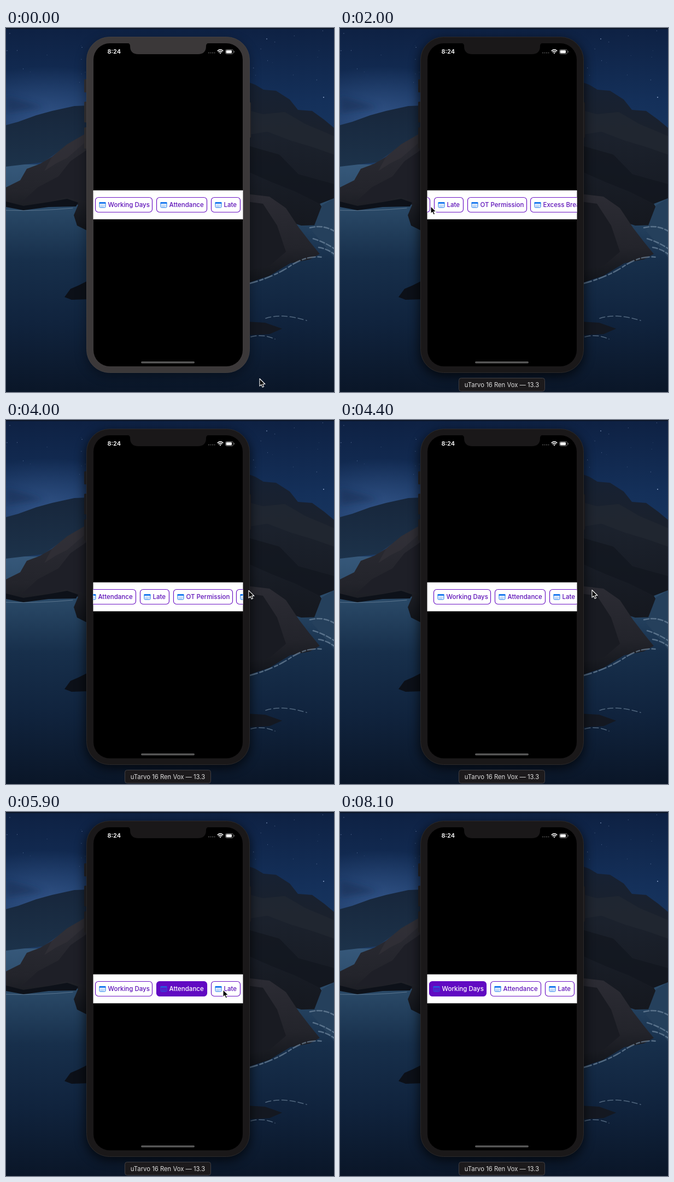
An HTML page for the animation above (8.2 s loop, 600x667 px).

```html
<!DOCTYPE html>
<html lang="en">
<head>
<meta charset="utf-8">
<title>Chip scroller</title>
<style>
  html, body { margin: 0; width: 100%; height: 100%; overflow: hidden; background: #0b1a35; }
  svg { display: block; width: 600px; height: 667px; font-family: Inter, Roboto, sans-serif; }
  .case { fill: #3b3839; stroke: #434041; }
  .key { fill: #2c2a2c; }
  .active .case { fill: #1a1819; stroke: #2b292a; }
  .active .key { fill: #1b1a1c; }
  .glow { opacity: .35; }
  .active .glow { opacity: .7; }
  .chip .box { fill: #fff; stroke: #6a12c4; stroke-width: 1.2; }
  .chip text { fill: #5d10b8; font-size: 11.5px; font-weight: 500; }
  .chip .page { fill: #f2f8ff; stroke: #1878ee; }
  .chip .head { fill: #1878ee; }
  .chip .rows { stroke: #5f9fe8; stroke-width: .9; stroke-dasharray: 1.3 .9; }
  .chip.on .box { fill: #610ac2; stroke: #610ac2; }
  .chip.on text { fill: #fff; }
  .chip.on .page { fill: #5a16c8; stroke: #2b55dc; }
  .chip.on .head { fill: #2b55dc; }
  .chip.on .rows { stroke: #3550dc; }
</style>
</head>
<body>
<svg viewBox="0 0 600 667">
  <defs>
    <linearGradient id="sky" x2="0" y2="1">
      <stop offset="0" stop-color="#0e2143"/>
      <stop offset=".45" stop-color="#14305a"/>
      <stop offset="1" stop-color="#1d3d66"/>
    </linearGradient>
    <radialGradient id="dusk">
      <stop offset="0" stop-color="#34568a" stop-opacity=".9"/>
      <stop offset="1" stop-color="#34568a" stop-opacity="0"/>
    </radialGradient>
    <linearGradient id="sea" x2="0" y2="1">
      <stop offset="0" stop-color="#36587a"/>
      <stop offset=".2" stop-color="#294866"/>
      <stop offset=".42" stop-color="#172f4b"/>
      <stop offset=".7" stop-color="#10233d"/>
      <stop offset="1" stop-color="#0a1628"/>
    </linearGradient>
    <linearGradient id="far" x2="0" y2="1">
      <stop offset="0" stop-color="#17263b"/>
      <stop offset="1" stop-color="#1c324a"/>
    </linearGradient>
    <linearGradient id="rock" x2="0" y2="1">
      <stop offset="0" stop-color="#2c2c34"/>
      <stop offset=".6" stop-color="#23242b"/>
      <stop offset="1" stop-color="#11141a"/>
    </linearGradient>
    <linearGradient id="peak" x2="0" y2="1">
      <stop offset="0" stop-color="#162133"/>
      <stop offset=".4" stop-color="#1b212c"/>
      <stop offset="1" stop-color="#15181f"/>
    </linearGradient>
    <filter id="soft" x="-30%" y="-20%" width="160%" height="140%"><feGaussianBlur stdDeviation="10"/></filter>
    <filter id="haze" x="-40%" y="-40%" width="180%" height="180%"><feGaussianBlur stdDeviation="6"/></filter>
    <clipPath id="view"><rect x="159.5" y="297.5" width="274" height="53"/></clipPath>
  </defs>

  <!-- coast at dusk -->
  <rect width="600" height="300" fill="url(#sky)"/>
  <ellipse cx="75" cy="165" rx="190" ry="95" fill="url(#dusk)"/>
  <rect width="600" height="2" fill="#0b1527"/>
  <path d="M0 126Q40 136 70 146L0 156Z" fill="#142a50" opacity=".5" filter="url(#haze)"/>
  <g id="stars" fill="#9db4d8"></g>
  <rect y="250" width="600" height="417" fill="url(#sea)"/>
  <path d="M0 178L22 172L55 160L84 152L125 143L150 142V195L105 220L68 246L0 254Z" fill="url(#far)"/>
  <path d="M150 191L112 213L84 236L62 249L38 258L26 279L0 292V324L32 331L78 325L112 318L132 324L124 343L130 362L150 372Z" fill="url(#rock)"/>
  <path d="M150 222L118 244L96 272L58 292L30 318L78 318L108 310L150 318Z" fill="#1e1f27"/>
  <path d="M112 213L84 236L70 262L92 248L112 238L150 205V191Z" fill="#34323a" opacity=".6"/>
  <path d="M0 318L32 326L78 319L112 313L132 320L128 327L78 328L32 334L0 328Z" fill="#0d1119"/>
  <path d="M107 493L118 478L132 472L150 463V497L120 498Z" fill="#0c1018"/>
  <path d="M440 98L456 104L471 113L494 115L519 131L534 150L560 152L582 168L600 183V312L574 322L586 342L582 361L540 362L440 330Z" fill="url(#peak)"/>
  <path d="M440 150L470 158L510 154L548 176L600 198V232L560 218L520 206L478 190L440 196Z" fill="#232832" opacity=".7"/>
  <path d="M440 215L500 232L535 268L600 286V312L574 322L530 300L485 282L440 262Z" fill="#12161f" opacity=".7"/>
  <path d="M578 325L600 312V420L560 372Z" fill="#25405c"/>
  <path d="M440 304L482 309L512 330L536 366L556 392L574 414L556 424L520 431L482 454L440 468Z" fill="url(#rock)"/>
  <path d="M440 318L470 322L496 362L512 410L484 434L440 446Z" fill="#191b22"/>
  <path d="M440 538L474 540L505 551L482 561L440 563Z" fill="#141821"/>
  <g fill="none" stroke="#7d94ab" stroke-linecap="round" opacity=".6">
    <path d="M446 468Q490 456 520 436T578 420" stroke-width="2.5" stroke-dasharray="14 5 6 4"/>
    <path d="M556 366Q580 360 600 372M562 386Q582 392 600 404M572 402Q586 404 600 414" stroke-width="2.5" stroke-dasharray="9 4"/>
    <path d="M475 532Q505 522 550 536M448 566Q470 560 492 570" stroke-width="1.5" stroke-dasharray="10 5"/>
    <path d="M0 334Q60 336 122 330" stroke-width="1"/>
  </g>

  <!-- handset -->
  <g id="phone">
    <rect class="glow" x="145" y="22" width="302" height="616" rx="44" filter="url(#soft)"/>
    <g class="key">
      <rect x="143" y="94" width="6" height="24" rx="1.5"/>
      <rect x="143" y="135" width="6" height="38" rx="1.5"/>
      <rect x="143" y="182" width="6" height="39" rx="1.5"/>
      <rect x="443" y="136" width="5" height="65" rx="1.5"/>
    </g>
    <rect class="case" x="147.5" y="16.5" width="298" height="615" rx="42"/>
    <rect x="160" y="28" width="273" height="592" rx="30"/>
    <path class="case" style="stroke:none" d="M222 27.5Q227 28 227 33Q227 48 242 48H351Q366 48 366 33Q366 28 371 27.5Z"/>
    <text x="185.5" y="47" fill="#fff" font-size="11" font-weight="600">8:24</text>
    <path d="M370 45.5H383" stroke="#555" stroke-width="1.6" stroke-dasharray="2 1.5"/>
    <g fill="none" stroke="#fff" stroke-width="1.7">
      <path d="M386.8 42.1Q392 37.2 397.2 42.1M388.7 44.2Q392 41.2 395.3 44.2"/>
      <path d="M390.3 45.4L392 47.3L393.7 45.4Q392 44.2 390.3 45.4Z" fill="#fff" stroke="none"/>
    </g>
    <rect x="401.5" y="39.5" width="14" height="8" rx="2.3" fill="none" stroke="#777"/>
    <rect x="402.7" y="40.7" width="10.3" height="5.6" rx="1.2" fill="#fff"/>
    <path d="M417.5 42V45" stroke="#777"/>
    <rect x="159.5" y="297.5" width="274" height="53" fill="#fff"/>
    <g clip-path="url(#view)"><g id="row"></g></g>
    <rect x="247" y="611" width="98" height="3.5" rx="1.75" fill="#575757"/>
  </g>

  <g id="label">
    <rect x="217.5" y="641.5" width="157" height="24" rx="4" fill="#1c1a1c" stroke="#413f43"/>
    <text x="296" y="657.5" text-anchor="middle" font-size="11.3" fill="#dedede">uTarvo 16 Ren Vox — 13.3</text>
  </g>
  <path id="cursor" d="M0 -.5V13.2L3.1 10.4L5.2 15.2L7.6 14.1L5.5 9.5H9.9Z" fill="#000" stroke="#fff" stroke-width="1.1" stroke-linejoin="round"/>
</svg>
<script>
const LOOP = 8200, STEP = 100;
const $ = id => document.getElementById(id);

// left edge, width, label
const CHIPS = [
  [163.5, 104, 'Working Days'],
  [275.5, 92, 'Attendance'],
  [375.5, 53, 'Late'],
  [436.5, 108, 'OT Permission'],
  [551.5, 102, 'Excess Break'],
  [661.5, 95, 'Excess Stay'],
  [763.5, 95, '']
];
// time, x, y
const POINTER = [
  [0, 464, 643], [300, 464, 643], [1300, 378, 345], [1500, 375, 340],
  [2000, 166, 327], [2200, 166, 327], [2700, 371, 330], [3200, 231, 324],
  [3500, 231, 324], [4100, 461, 312], [4500, 461, 312], [5100, 225, 328],
  [5300, 225, 328], [5600, 325, 327], [5700, 325, 327], [5900, 397, 326],
  [6300, 397, 326], [6800, 225, 327]
];
// time, scroll offset
const SCROLL = [
  [1500, 0], [2000, 203], [2700, 203], [3200, 343], [3500, 343],
  [4100, 113], [4400, -8], [4700, 0]
];
// time, selected chip
const PICKS = [[0, -1], [5200, 0], [5600, 1], [6100, 2], [6900, 0]];

function sample(table, t) {
  const i = table.findIndex(row => row[0] > t);
  if (i < 0) return table[table.length - 1].slice(1);
  if (i === 0) return table[0].slice(1);
  const a = table[i - 1], b = table[i];
  const u = (t - a[0]) / (b[0] - a[0]), e = u * u * (3 - 2 * u);
  return a.slice(1).map((v, k) => v + (b[k + 1] - v) * e);
}

$('row').innerHTML = CHIPS.map(([x, w, name]) => `
  <g class="chip" transform="translate(${x} 0)">
    <rect class="box" y="310.5" width="${w}" height="27" rx="5.5"/>
    <rect class="page" x="7.5" y="319.5" width="11" height="9.5" rx="1.4"/>
    <rect class="head" x="7" y="319" width="12" height="3" rx="1"/>
    <path class="rows" d="M10 324.2H17M9.5 326H17M9.5 327.7H15"/>
    <text x="23" y="328.3">${name}</text>
  </g>`).join('');
const chips = [...$('row').children];

let seed = 11;
const rand = () => (seed = seed * 16807 % 2147483647) / 2147483647;
$('stars').innerHTML = Array.from({ length: 26 }, (_, i) => {
  const x = i % 2 ? 450 + rand() * 148 : rand() * 145;
  return `<circle cx="${x}" cy="${5 + rand() * 95}" r="${.3 + rand() * .4}" opacity=".6"/>`;
}).join('') + '<circle cx="581" cy="127" r=".9"/><circle cx="477" cy="20" r=".8"/>';

function draw(t) {
  const [x, y] = sample(POINTER, t);
  $('cursor').setAttribute('transform', `translate(${x} ${y})`);
  $('cursor').style.display = t < 7700 ? '' : 'none';
  $('row').setAttribute('transform', `translate(${-sample(SCROLL, t)[0]} 0)`);
  $('phone').classList.toggle('active', t >= 1600);
  $('label').style.opacity = Math.min(1, Math.max(0, (t - 700) / 300));
  const pick = PICKS.filter(p => p[0] <= t).pop()[1];
  chips.forEach((chip, i) => chip.classList.toggle('on', i === pick));
}

const start = performance.now();
function tick() {
  const t = (performance.now() - start) % LOOP;
  draw(Math.floor(t / STEP) * STEP);
  requestAnimationFrame(tick);
}
tick();
</script>
</body>
</html>
```
